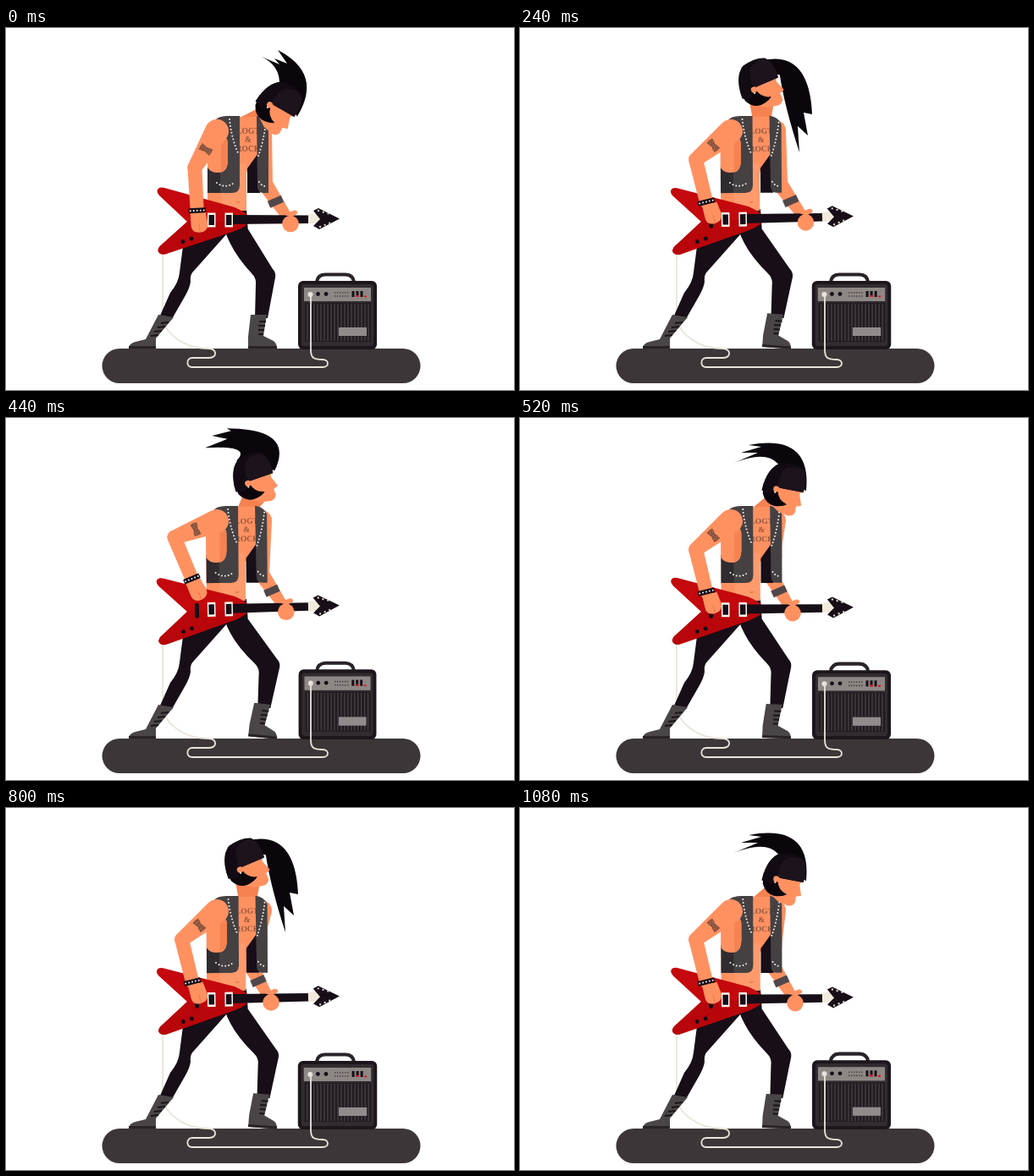
An HTML page for the animation above (1.12 s loop, 600x428 px).

```html
<!DOCTYPE html>
<html lang="en">
<head>
<meta charset="utf-8">
<title>Guitarist</title>
<style>
  html, body { margin: 0; width: 100%; height: 100%; overflow: hidden; background: #fff; }
  svg { display: block; width: 100vw; height: 100vh; }
  .ink { fill: #170e18; }
  .skin { fill: #ff9161; }
  .shade { fill: #f58250; }
  .boot { fill: #4a4546; }
  .vest { fill: #454143; }
  .studs { fill: none; stroke: #f4eeee; stroke-width: 2; stroke-linecap: round; stroke-dasharray: 0 4; }
  .tattoo { fill: none; stroke: #81513f; stroke-width: 1.7; }
  text { font: bold 9.5px "Liberation Serif", serif; fill: #94573f; text-anchor: middle; }
</style>
</head>
<body>
<svg viewBox="0 0 600 428">
  <rect x="113.5" y="379" width="376" height="41" rx="20.5" fill="#3d3638"/>

  <g id="amp">
    <path d="M367 300 Q368 292 377 291.500 H401 Q410 292 411 300" fill="none" stroke="#2a242a" stroke-width="4"/>
    <rect x="345" y="299" width="93" height="81" rx="6" fill="#1d171d"/>
    <rect x="349" y="303" width="85" height="73" rx="3" fill="#322c31"/>
    <rect x="352" y="307" width="79" height="16" fill="#8e8885"/>
    <rect x="353" y="325" width="78" height="46" fill="#211b21"/>
    <path id="grill" stroke="#4b4549" stroke-width="1.200"/>
    <rect x="393" y="354" width="33" height="10" fill="#918c8b"/>
    <g class="ink">
      <circle cx="368.500" cy="314.500" r="2.400"/><circle cx="378" cy="314.500" r="2.400"/>
      <rect x="408.500" y="311" width="3" height="7"/><rect x="413.500" y="311" width="3" height="7"/><rect x="418.500" y="311" width="3" height="7"/>
    </g>
    <path d="M388 313 H406 M388 317 H406" stroke="#4b4146" stroke-width="1.500" stroke-dasharray="1.500 1.500"/>
    <path d="M413 317 H417 M423 317.500 H426" stroke="#c5242b" stroke-width="2"/>
    <circle cx="359.500" cy="315" r="3" fill="#e8e1db"/>
  </g>

  <path d="M185 266 V340 C185 358 207 379 240 379 C249 379 250 390 240 390 H220
    C213 390 212 401 220 401 H374 C382 401 382 392 374 392 C363 392 360 390 360 380 V316"
    fill="none" stroke="#e9e5db" stroke-width="1.800"/>

  <path class="ink" d="M238 214 H284 L286 242 L262 242 L222 287 Q217 291 218 300 Q217 307 212 316 L196 344 L182 340
    L194 313 Q204 301 205 289 L209 258 Z"/>
  <path class="ink" id="leg"/>
  <g>
    <path class="boot" d="M180 339 L198 342 L177 367 V379 H145 Q145 373 153 371 L165 368 Z"/>
    <path d="M183 349 L192 348 M179 354 L188 353 M175 359 L184 358 M171 364 L180 363" stroke="#1b151b" stroke-width="2"/>
    <path d="M145 377.500 H177" stroke="#292327" stroke-width="3"/>
  </g>
  <g id="boot">
    <path class="boot" d="M289 339 H308 L304 364 L316 370 Q320 373 320 379 H286 V365 Z"/>
    <path d="M299 347 H307 M298 352 H306 M298 357 H305 M298 362 H304" stroke="#1b151b" stroke-width="2"/>
    <path d="M286 377.500 H320" stroke="#292327" stroke-width="3"/>
  </g>

  <g id="farArm">
    <path class="skin" id="farUpper"/>
    <path class="skin" id="farFore"/>
    <path id="armband" stroke="#51474a" stroke-width="8.500"/>
  </g>
  <path class="shade" id="neck"/>

  <g id="torso">
    <path class="skin" d="M254 105 H299 L310 113 V166 L284 170 V216 H238 V125 Q242 109 254 105 Z"/>
    <path d="M254 160 H284 V216 H254 Z" fill="#ff9a6c"/>
    <path d="M272 205 q2 3 4 0" fill="none" stroke="#d96b3d"/>
    <g>
      <text x="286" y="125">LOGT</text>
      <text x="286" y="135">&amp;</text>
      <text x="286" y="146">ROCK</text>
    </g>
    <path class="ink" d="M298 148 L285 166 V195 H300 Z"/>
    <path d="M238 162 H254 V195 H238 Z" fill="#302b2e"/>
    <path class="vest" d="M248 108 Q253 104 262 104 H276 V186 Q276 195 267 195 H253 V171 Q262 169 262 157 V136 Z"/>
    <path class="vest" d="M296 104 Q306 105 310 114 V195 H304 Q297 195 297 187 Z"/>
    <path class="skin" d="M238 120 L250 108 L262 134 V156 Q262 171 250 171 Q242 171 238 165 Z"/>
    <path class="shade" d="M254 120 L262 136 V156 Q262 166 254 170 Z"/>
    <path class="studs" d="M264 108 Q266 130 275 150 M249 183 Q260 191 271 182 M307 112 Q304 135 298 151 M299 182 Q303 188 309 187"/>
  </g>

  <path id="hair" fill="#0b060c"/>
  <g id="head">
    <path class="skin" d="M-6 -3 L31 -3 L28 3 L32 16 L26 18 L26 25 Q24 30 18 30 L6 27 L-12 14 Z"/>
    <path d="M-16 -4 L-15 9 Q-10 20 0 21 Q10 21 15 17 Q4 14 2 3 L-3 -4 Z" fill="#0b060c"/>
    <path d="M-17 5 Q-15 -22 0 -30 Q18 -33 28 -27 Q35 -17 32 0 L0 -1 L-6 9 Z" fill="#120b13"/>
    <path d="M1 -1 Q0 -18 8 -25 Q22 -31 29 -25 Q35 -16 32 0 Z" fill="#1c131d"/>
    <circle class="skin" cx="0" cy="1" r="3.600"/>
    <circle cx="-1" cy="5" r="1" fill="#fff0df"/>
  </g>

  <g id="guitar">
    <path d="M187 189 L270 212 Q286 219 288 226 Q286 234 270 240 L189 267 Q181 269 179.500 263 Q180 259 184 256
      L214 229 L181 198 Q176 192 181 189 Q184 188 187 189 Z" fill="#c4080d"/>
    <path d="M214 229 L288 227 Q286 234 270 240 L189 267 Q181 269 179.500 263 Q180 259 184 256 Z" fill="#b8060b"/>
    <g class="ink">
      <rect x="223" y="219" width="5" height="18" rx="2.500"/>
      <circle cx="209" cy="252.500" r="2.500"/><circle cx="219" cy="249" r="2.500"/>
      <path d="M266 221 L358 221.500 V231 L266 232 Z"/>
    </g>
    <path d="M357 221 Q364 217 370 222 V229 Q364 233 357 231 Z" fill="#f1eadc"/>
    <path class="ink" d="M363 216 L369 213 L394 225.500 L370 238 L363 234 L371 226 Z"/>
    <path d="M369 216 L383 220 M371 235 L384 230" stroke="#d8d0ca" stroke-width="2.400" stroke-linecap="round" stroke-dasharray="0 6"/>
    <g fill="#fff6ed"><rect x="238" y="218.500" width="9.500" height="17"/><rect x="258.500" y="218.500" width="9.500" height="17"/></g>
    <g class="ink"><rect x="239.500" y="221" width="6.500" height="12"/><rect x="260" y="221" width="6.500" height="12"/></g>
  </g>

  <g id="fretHand">
    <path class="skin" d="M-8 -11 L4 -16 Q9 -16 8 -12 L1 -8 Z"/>
    <circle class="skin" r="9.800"/>
  </g>

  <path class="skin" id="upperArm"/>
  <path class="skin" id="foreArm"/>
  <g id="knot" class="tattoo">
    <path d="M-7 -4 Q0 8 7 -4 M-7 4 Q0 -8 7 4"/>
    <circle cx="-4" r="3"/><circle cx="4" r="3"/>
  </g>
  <g id="hand">
    <path class="skin" d="M-9 -12 H9 L11 3 Q10 12 1 12 Q-9 12 -9 3 Z"/>
    <path d="M1 2 V11" stroke="#ec7747"/>
  </g>
  <g id="cuff">
    <rect class="ink" x="-10" y="-3" width="20" height="6" rx="1"/>
    <path class="studs" d="M-8 0 H8.500"/>
  </g>
</svg>
<script>
const LOOP = 1120, BEAT = 560, STEP = 40;
const $ = id => document.getElementById(id);
const set = (id, d) => $(id).setAttribute('d', d);
const move = (id, value) => $(id).setAttribute('transform', value);
const mix = (a, b, k) => a + (b - a) * k;

// time, ear x, ear y, head angle, body lift, amp width, amp height
const poseKeys = [
  [0, 312, 90, 28, 0, 1, 1],
  [80, 306, 84, 21, 0, 1.05, .955],
  [160, 297, 77, 0, .3, 1.025, .985],
  [240, 276, 72, -25, .55, 1.005, 1],
  [360, 272, 72, -42, 1, .98, 1.025],
  [520, 303, 83, 9, .3, 1, 1.01]
];

// time, rear bend, then tip / notch / tip / notch / tip, front bend
const hairKeys = [
  [0, 322, 44, 302, 34, 323, 43, 317, 36, 332, 42, 321, 26, 375, 54],
  [40, 333, 46, 348, 44, 346, 57, 364, 60, 354, 74, 371, 82, 356, 90],
  [80, 343, 62, 357, 83, 349, 97, 366, 107, 346, 129, 321, 121, 338, 108],
  [160, 362, 48, 363, 121, 346, 117, 361, 136, 341, 128, 349, 147, 320, 108],
  [240, 341, 10, 345, 102, 335, 100, 340, 127, 328, 116, 330, 147, 312, 91],
  [300, 322, 6, 356, 50, 338, 52, 354, 68, 332, 66, 341, 83, 312, 62],
  [360, 302, 24, 247, 20, 264, 16, 255, 11, 268, 9, 274, 6, 339, 22],
  [520, 290, 38, 253, 53, 281, 41, 261, 41, 285, 34, 270, 32, 345, 18]
];

const fretKeys = [[0, 336], [160, 336], [360, 337.5], [520, 322], [640, 312], [800, 313], [1080, 325]];

// Smooth periodic interpolation through rows of [time, ...values].
function sample(keys, period, time) {
  const t = time % period, n = keys.length;
  const at = i => {
    const turn = Math.floor(i / n), row = keys[i - turn * n];
    return [row[0] + turn * period, ...row.slice(1)];
  };
  let i = n - 1;
  while (keys[i][0] > t) i--;
  const [a, b, c, d] = [-1, 0, 1, 2].map(k => at(i + k));
  const span = c[0] - b[0], u = (t - b[0]) / span;
  return b.slice(1).map((p, j) => {
    const q = c[j + 1];
    const m0 = (q - a[j + 1]) / (c[0] - a[0]) * span;
    const m1 = (d[j + 1] - p) / (d[0] - b[0]) * span;
    return p + u * (m0 + u * (3 * (q - p) - 2 * m0 - m1 + u * (2 * (p - q) + m0 + m1)));
  });
}

// Outline around two circles; the first one is the larger.
function limb(x1, y1, r1, x2, y2, r2) {
  const dir = Math.atan2(y2 - y1, x2 - x1);
  const open = Math.acos((r1 - r2) / Math.hypot(x2 - x1, y2 - y1));
  const on = (x, y, r, a) => `${x + r * Math.cos(a)} ${y + r * Math.sin(a)}`;
  return `M${on(x1, y1, r1, dir + open)} L${on(x2, y2, r2, dir + open)}
    A${r2} ${r2} 0 0 0 ${on(x2, y2, r2, dir - open)}
    L${on(x1, y1, r1, dir - open)} A${r1} ${r1} 0 1 0 ${on(x1, y1, r1, dir + open)}Z`;
}

function drawHead(t, x, y, angle, lift) {
  const a = angle * Math.PI / 180, cos = Math.cos(a), sin = Math.sin(a);
  const local = (px, py) => `${x + px * cos - py * sin} ${y + px * sin + py * cos}`;
  move('head', `translate(${x} ${y}) rotate(${angle})`);
  set('neck', `M${276 - 3 * lift} 106 L${local(-11, 12)} L${local(14, 26)} L${297 - 2 * lift} 110 L288 130Z`);
  const h = sample(hairKeys, BEAT, t);
  const p = i => `${h[2 * i]} ${h[2 * i + 1]}`;
  set('hair', `M${local(-3, -29)} Q${p(0)} ${p(1)} L${p(2)} L${p(3)} L${p(4)} L${p(5)} Q${p(6)} ${local(35, -2)}Z`);
}

function drawFretArm(t, lift) {
  const [x] = sample(fretKeys, LOOP, t), y = 231.5 - 3 * lift;
  const ex = 307 + .8 * (x - 336), ey = 186;
  const wx = x - 4, wy = y - 8;
  set('farUpper', limb(302, 121, 12, ex, ey, 8));
  set('farFore', limb(ex, ey, 9, wx, wy, 6));
  const bx = mix(ex, wx, .46), by = mix(ey, wy, .46) + 2;
  set('armband', `M${bx - 8} ${by + 3.5} L${bx + 8} ${by - 3.5}`);
  move('fretHand', `translate(${x} ${y})`);
}

function drawStrumArm(t) {
  const s = Math.cos((t - 25) / 280 * 2 * Math.PI);
  const ex = 206 + 14 * s + 7 * s * s, ey = 154 + 13 * s;
  const wx = 219.5 + 4 * s + 4 * s * s, wy = 204 + 14 * s;
  const sx = 249, sy = 122;
  const deg = (dx, dy) => Math.atan2(dy, dx) * 180 / Math.PI - 90;
  const tilt = deg(wx - ex, wy - ey);
  set('upperArm', limb(sx, sy, 14, ex, ey, 8.5));
  set('foreArm', limb(ex, ey, 8.5, wx, wy, 8));
  move('knot', `translate(${mix(sx, ex, .5)} ${mix(sy, ey, .5)}) rotate(${deg(ex - sx, ey - sy)})`);
  move('cuff', `translate(${wx} ${wy}) rotate(${tilt})`);
  move('hand', `translate(${226.5 + s} ${wy + 14}) rotate(${tilt})`);
}

function draw(t) {
  const [x, y, angle, lift, ampW, ampH] = sample(poseKeys, BEAT, t);
  const knee = 7 * lift, ankle = 4.5 * lift;
  set('leg', `M258 238 L286 238 L${315 + knee} 285 Q${319 + knee} 289 ${318 + knee} 295
    L${309 + ankle} 343 H${294 + ankle} L${295 + knee * .7} 303 Q${296 + knee * .7} 296 ${290 + knee * .7} 290
    Q266 264 258 238Z`);
  move('boot', `rotate(${8 * lift} 312 379)`);
  move('torso', `translate(${-1.5 * lift} 0) rotate(${-.6 * lift} 262 215)`);
  move('guitar', `rotate(${-1.8 * lift} 215 229)`);
  move('amp', `translate(392 380) scale(${ampW} ${ampH}) translate(-392 -380)`);
  drawHead(t, x, y, angle, lift);
  drawFretArm(t, lift);
  drawStrumArm(t);
}

set('grill', Array.from({ length: 19 }, (_, i) => `M${356 + i * 4} 326 V370`).join(''));

const start = performance.now();
function tick() {
  const t = (performance.now() - start) % LOOP;
  draw(Math.floor(t / STEP) * STEP);
  requestAnimationFrame(tick);
}
tick();
</script>
</body>
</html>
```
